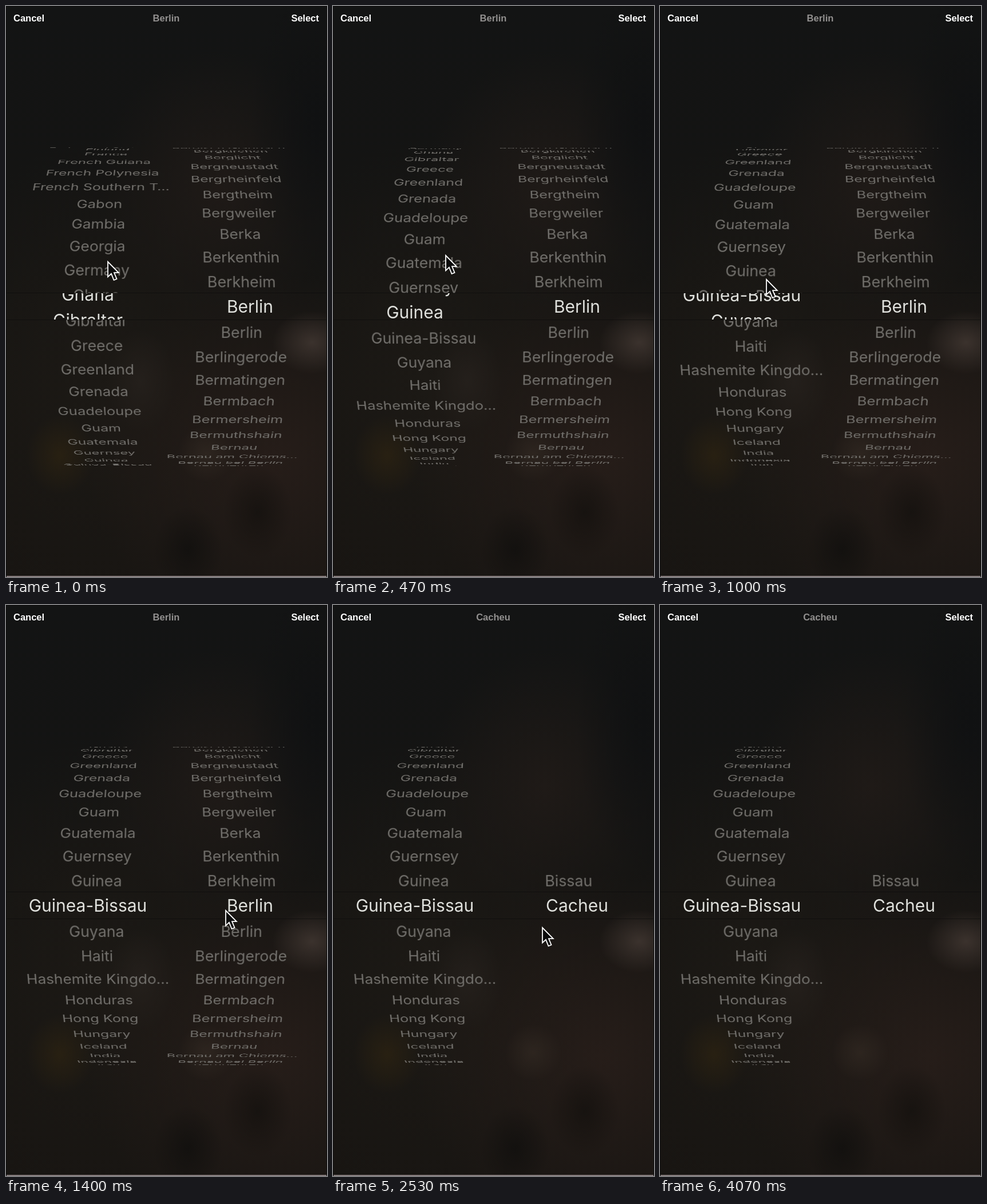
An HTML page for the animation above (4.99 s loop, 561 by 998 pixels).

```html
<!DOCTYPE html>
<html lang="en">
<head>
<meta charset="utf-8">
<title>Country and city picker</title>
<style>
  html, body { margin: 0; width: 100%; height: 100%; overflow: hidden; background: #141312; }
  #stage {
    position: relative; width: 561px; height: 998px; overflow: hidden;
    font-family: Inter, Roboto, sans-serif;
    background:
      radial-gradient(70px 55px at 535px 588px, #3b322d 0%, #3b322d00 100%),
      radial-gradient(50px 50px at 350px 782px, #2d251f 0%, #2d251f00 100%),
      radial-gradient(60px 70px at 95px 785px, #282012 0%, #28201200 100%),
      radial-gradient(60px 90px at 235px 655px, #26211dcc 0%, #26211d00 100%),
      radial-gradient(60px 80px at 440px 885px, #171310 0%, #17131000 100%),
      radial-gradient(60px 75px at 318px 950px, #13110f 0%, #13110f00 100%),
      radial-gradient(120px 260px at 545px 210px, #101112 0%, #10111200 100%),
      radial-gradient(210px 240px at 370px 320px, #1f1a17 0%, #1f1a1700 100%),
      radial-gradient(330px 320px at 470px 790px, #261d19 0%, #261d1900 100%),
      radial-gradient(300px 420px at 160px 650px, #1c1915 0%, #1c191500 100%),
      linear-gradient(#131414, #141413 30%, #171512 70%, #181512);
  }
  #stage::after {
    content: ""; position: absolute; inset: 0;
    border: solid #0a0a0a; border-width: 1px 1px 0 1px;
    box-shadow: inset 0 -2px #857b7c;
  }
  header { font: bold 16.5px/42px "Liberation Sans", Arial, sans-serif; color: #fff; }
  header span { position: absolute; top: 0; }
  #title { left: 0; width: 560px; text-align: center; color: #92908f; }
  #dim {
    position: absolute; inset: 0; color: #73716d;
    perspective: 1160px; perspective-origin: 280.5px 525.5px;
    clip-path: polygon(0 0, 100% 0, 100% 502px, 0 502px, 0 548px, 100% 548px, 100% 100%, 0 100%);
  }
  .wheel {
    position: absolute; top: 503.5px; width: 320px; height: 44px;
    transform-style: preserve-3d;
  }
  .wheel div {
    position: absolute; inset: 0; backface-visibility: hidden;
    font-size: 26.8px; line-height: 44px; text-align: center; white-space: nowrap;
  }
  #band {
    position: absolute; left: 0; top: 501px; width: 561px; height: 46px; overflow: hidden;
    border: solid #0b0a0a99; border-width: 1px 0; color: #dfe0dc;
  }
  .strip { position: absolute; top: 1px; width: 360px; }
  .strip div {
    position: absolute; width: 100%;
    font-size: 30px; line-height: 45px; text-align: center; white-space: nowrap;
  }
  #cursor { position: absolute; left: 0; top: 0; overflow: visible; z-index: 2; }
</style>
</head>
<body>
<div id="stage">
  <header>
    <span style="left:13px">Cancel</span>
    <span id="title"></span>
    <span style="right:14px">Select</span>
  </header>
  <div id="dim"></div>
  <div id="band"></div>
  <svg id="cursor" width="22" height="36">
    <path d="M1 1V27.5L7 21.8L11.5 33L16.5 31L12 20.2H19.8Z" fill="#0c0c0c" stroke="#fff" stroke-width="1.8"/>
  </svg>
</div>
<script>
const LOOP = 4990, FPS = 15;
const RADIUS = 353, STEP = 7.22, ROW = 45;
const $ = id => document.getElementById(id);

const countries = ["Federated States o…", "Finland", "France", "French Guiana", "French Polynesia",
  "French Southern T…", "Gabon", "Gambia", "Georgia", "Germany", "Ghana", "Gibraltar", "Greece",
  "Greenland", "Grenada", "Guadeloupe", "Guam", "Guatemala", "Guernsey", "Guinea", "Guinea-Bissau",
  "Guyana", "Haiti", "Hashemite Kingdo…", "Honduras", "Hong Kong", "Hungary", "Iceland", "India",
  "Indonesia", "Iran", "Iraq"];
const german = ["Bergisch Gladbach", "Bergkirchen", "Berglicht", "Bergneustadt", "Bergrheinfeld",
  "Bergtheim", "Bergweiler", "Berka", "Berkenthin", "Berkheim", "Berlin", "Berlin", "Berlingerode",
  "Bermatingen", "Bermbach", "Bermersheim", "Bermuthshain", "Bernau", "Bernau am Chiems…",
  "Bernau bei Berlin", "Bernbeuren"];

// A picker column: a dim 3D drum plus a flat, enlarged strip inside the selection band.
function column(names, zero, drumX, stripX) {
  const add = (parent, cls, x, place) => {
    const box = document.createElement("div");
    box.className = cls;
    box.style.left = x + "px";
    names.forEach((name, n) => {
      const row = document.createElement("div");
      row.textContent = name;
      row.style.transform = place(n - zero);
      box.append(row);
    });
    parent.append(box);
    return box;
  };
  const drum = add($("dim"), "wheel", drumX - 160, i => `rotateX(${-i * STEP}deg) translateZ(${RADIUS}px)`);
  const strip = add($("band"), "strip", stripX - 180, i => `translateY(${i * ROW}px)`);
  return {
    turn(row) {
      drum.style.transform = `translateZ(${-RADIUS}px) rotateX(${row * STEP}deg)`;
      strip.style.transform = `translateY(${-row * ROW}px)`;
    },
    show(on) { drum.style.display = strip.style.display = on ? "" : "none"; }
  };
}

const left = column(countries, 10, 158, 143);
const rightA = column(german, 10, 411.5, 426.5);
const rightB = column(["Bissau", "Cacheu"], 0, 411.5, 426.5);

// Key points: tick (1/15 s), then values.
const leftRow = [[0, .47], [1, 2.25], [2, 3.77], [3, 5.1], [4, 6.2], [5, 7.2], [6, 7.2], [7, 8.77],
  [9, 9.9], [11, 10.77], [14, 10.77], [15, 10.44], [16, 10.28], [17, 10.15], [18, 10.06], [20, 10]];
const rightRow = [[22, 1], [23, 1.08], [25, 1.5], [27, 1.78], [29, 1.78], [30, 1.73], [32, 1.3],
  [34, 1.08], [36, 1]];
const pointer = [[0, 177, 446], [5, 187, 437], [6, 187, 437], [7, 196, 435], [11, 190, 463],
  [14, 190, 463], [15, 185, 477], [18, 270, 505], [21, 383, 533], [22, 384, 513], [27, 391, 411],
  [29, 391, 411], [30, 392, 415], [37, 367, 554], [38, 365, 563], [41, 430, 441]];

function at(keys, k) {
  const n = keys.findIndex(p => p[0] > k);
  if (n < 0) return keys[keys.length - 1].slice(1);
  if (n === 0) return keys[0].slice(1);
  const a = keys[n - 1], b = keys[n], u = (k - a[0]) / (b[0] - a[0]);
  return a.slice(1).map((v, i) => v + (b[i + 1] - v) * u);
}

function draw(ms) {
  const k = Math.floor((ms % LOOP + 4) * FPS / 1000);
  const swapped = k >= 22;
  left.turn(at(leftRow, k)[0]);
  rightA.turn(0);
  rightB.turn(at(rightRow, k)[0]);
  rightA.show(!swapped);
  rightB.show(swapped);
  $("title").textContent = swapped ? "Cacheu" : "Berlin";
  const [x, y] = at(pointer, k);
  $("cursor").style.transform = `translate(${x}px, ${y}px)`;
  $("cursor").style.visibility = k < 42 ? "visible" : "hidden";
}

let start;
function tick(now) {
  start ??= now;
  draw(now - start);
  requestAnimationFrame(tick);
}
draw(0);
requestAnimationFrame(tick);
</script>
</body>
</html>
```
